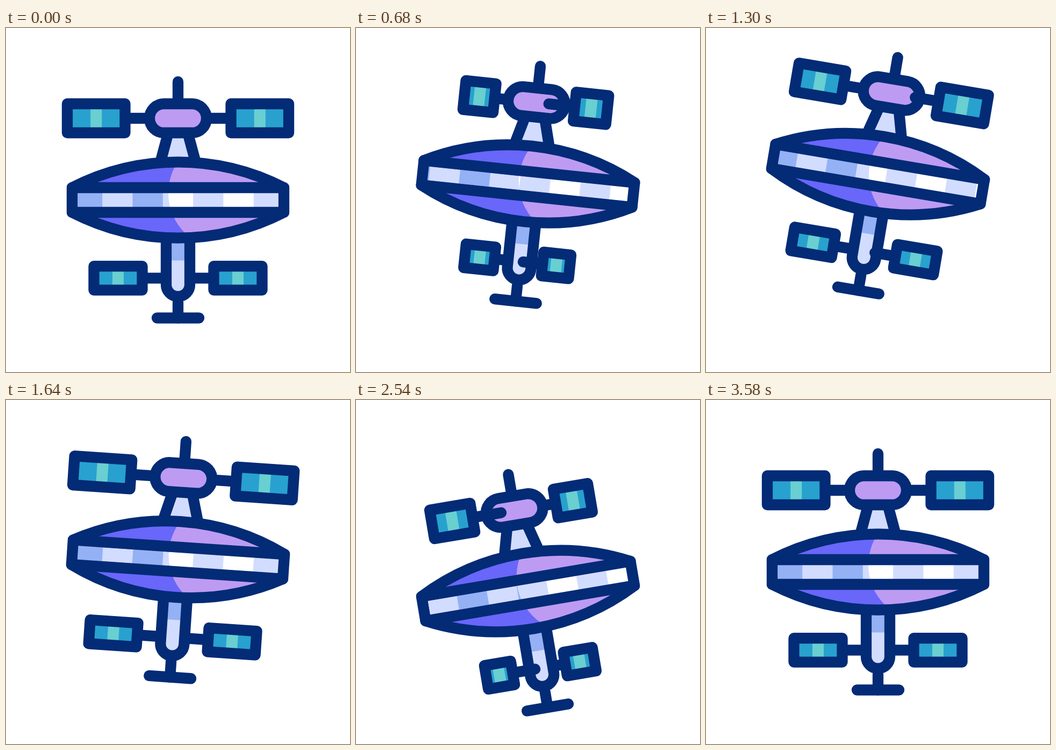
Recreate the animation shown at these times as an HTML page with a canvas. Size 640x640 px, loop 3600 ms.

```html
<!DOCTYPE html>
<html lang="en">
<head>
<meta charset="utf-8">
<title>Space station</title>
<style>
  html, body { margin: 0; width: 100%; height: 100%; overflow: hidden; background: #fff; }
  canvas { display: block; width: 640px; height: 640px; }
</style>
</head>
<body>
<canvas id="stage" width="640" height="640"></canvas>
<script>
const ctx = document.getElementById('stage').getContext('2d');
const LOOP = 3600;
const NAVY = '#032b76', VIOLET = '#6966fa', LILAC = '#bd9bf2';
const TEAL = '#28a1cf', MINT = '#69cfd1', BLUE = '#93b1f4', PALE = '#d2dcfe', WHITE = '#fff';

// Per wing: y, half height, resting near/far edges and cap,
// then [near, far, cap] travel for the left and right spin.
const WINGS = [
  { side: -1, y: -152, half: 27, near: 98.5, far: 206, cap: 57.5,
    travel: [[22.5, 80, 0], [21.5, 56, 36]] },
  { side: 1, y: -152, half: 27, near: 98.5, far: 206, cap: 57.5,
    travel: [[30.5, 83, 39], [22.8, 70, 0]] },
  { side: -1, y: 145.4, half: 22.2, near: 66.5, far: 156.5, cap: 26.3,
    travel: [[21.5, 60.5, 0], [14.3, 59, 16.7]] },
  { side: 1, y: 145.4, half: 22.2, near: 66.5, far: 156.5, cap: 26.3,
    travel: [[27, 71, 22.7], [23, 62, 0]] }
];

// Keys are [time, value] pairs, eased in and out between neighbours.
function track(t, keys) {
  for (let i = 1; i < keys.length; i++) {
    const [t0, v0] = keys[i - 1], [t1, v1] = keys[i];
    if (t < t1) {
      const x = (t - t0) / (t1 - t0);
      return v0 + (v1 - v0) * x * x * (3 - 2 * x);
    }
  }
  return keys[keys.length - 1][1];
}

function shape(path, fill, outlined = true) {
  if (fill) {
    ctx.fillStyle = fill;
    ctx.fill(path);
  }
  if (outlined) ctx.stroke(path);
}

function line(...points) {
  const path = new Path2D();
  for (let i = 0; i < points.length; i += 2) path.lineTo(points[i], points[i + 1]);
  ctx.stroke(path);
}

function rect(x, y, w, h, color) {
  ctx.fillStyle = color;
  ctx.fillRect(x, y, w, h);
}

function clipped(path, draw) {
  ctx.save();
  ctx.clip(path);
  draw();
  ctx.restore();
}

const hull = new Path2D('M-197-23A431 431 0 0 1 197-23V23A431 431 0 0 1-197 23Z');
const tube = new Path2D('M-22 70V157.5A22 22 0 0 0 22 157.5V70');
const pod = new Path2D('M-26-179H26A27 27 0 0 1 26-125H-26A27 27 0 0 1-26-179Z');
const neck = new Path2D('M-20-118L-31-77H31L20-118Z');
const band = new Path2D('M-187-13H187V13H-187Z');
const lit = new Path2D();
lit.arc(87, -13, 105, 0, 7);
lit.rect(87, -118, 200, 260);

function drawWing({ side, y, half, near, far, cap, travel }, spin, amount) {
  const [dNear, dFar, dCap] = travel[spin];
  const a = near - dNear * amount, b = far - dFar * amount;
  const left = side > 0 ? a : -b, width = b - a;
  line(side * (cap - dCap * amount), y, side * a, y);
  rect(left, y - half, width, half * 2, TEAL);
  rect(left + width / 2 - 10.5, y - half, 21, half * 2, MINT);
  ctx.strokeRect(left, y - half, width, half * 2);
}

function drawWindows(shift, light, dark) {
  const size = 56.3;
  rect(-190, -14, 380, 28, light);
  for (let k = -6; k <= 6; k++) rect(-84.5 + shift + k * size * 2, -14, size, 28, dark);
}

function drawHull(shift) {
  shape(hull, VIOLET, false);
  clipped(hull, () => shape(lit, LILAC, false));
  clipped(band, () => {
    drawWindows(shift, PALE, BLUE);
    clipped(lit, () => drawWindows(shift, WHITE, PALE));
  });
  line(-197, -23, 197, -23);
  line(-197, 23, 197, 23);
  shape(hull);
}

function drawTower() {
  line(0, -220, 0, -182);
  shape(neck, PALE, false);
  line(-20, -118, -31, -77);
  line(20, -118, 31, -77);
  shape(pod, LILAC);
  line(0, 190, 0, 219.5);
  line(-39, 219.5, 39, 219.5);
  shape(tube, PALE, false);
  rect(-18, 72, 36, 40.5, BLUE);
  shape(tube);
}

function draw(t) {
  const angle = track(t, [[0, 0], [1200, 10], [2400, -10], [3550, 0]]);
  const lift = track(t, [[0, 0], [1200, -50], [2400, 37], [3550, 0]]);
  const amount = track(t, [[0, 0], [860, 1], [1580, 0], [2310, 1], [3520, 0]]);
  const shift = track(t, [[0, 0], [860, -49], [1520, 0], [1800, 0], [2780, 76.5], [3560, 0]]);
  const spin = t < 1580 ? 0 : 1;
  const front = spin ? -1 : 1;
  const wings = side => WINGS.filter(w => w.side === side)
    .forEach(w => drawWing(w, spin, amount));

  ctx.setTransform(1, 0, 0, 1, 0, 0);
  rect(0, 0, 640, 640, WHITE);
  ctx.translate(320, 320 + lift);
  ctx.rotate(angle * Math.PI / 180);
  ctx.strokeStyle = NAVY;
  ctx.lineWidth = 20.3;
  ctx.lineCap = ctx.lineJoin = 'round';

  wings(-front);
  drawTower();
  drawHull(shift);
  wings(front);
}

function tick() {
  draw(performance.now() % LOOP);
  requestAnimationFrame(tick);
}
tick();
</script>
</body>
</html>
```
